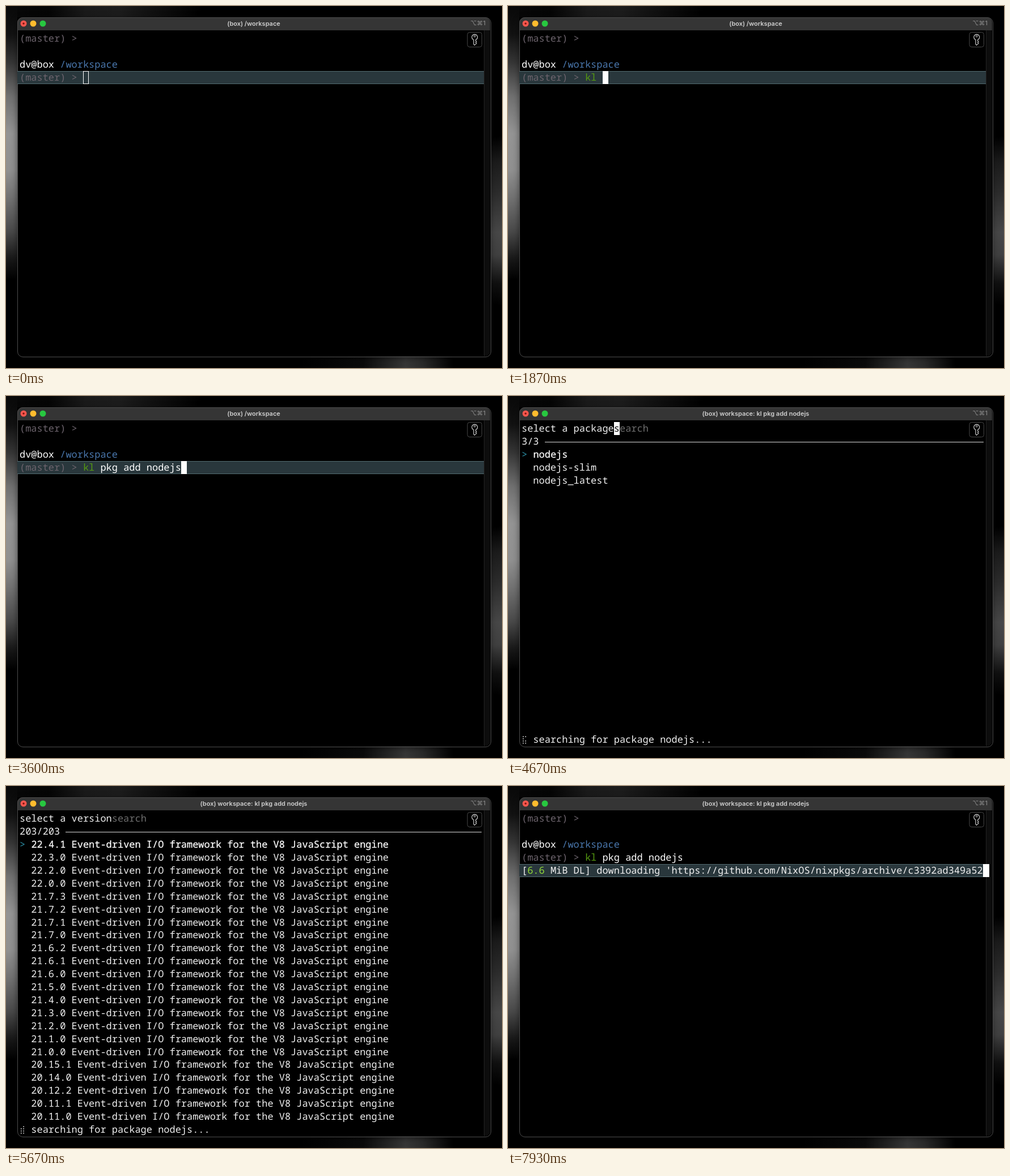
These frames come from a looping animation (875x640 px, 8 s). An HTML page:

```html
<!DOCTYPE html>
<html lang="en">
<head>
<meta charset="utf-8">
<title>Terminal</title>
<style>
html, body { margin: 0; width: 100%; height: 100%; overflow: hidden; background: #000; }
#stage { position: relative; width: 875px; height: 640px; overflow: hidden; background: #000; }
#stage div, #stage svg { position: absolute; }
.left { left: 0; top: 0; width: 20px; height: 640px;
  background: linear-gradient(#080808 0, #121212 50px, #363636 100px, #707070 160px, #949494 225px, #909090 290px, #6e6e6e 345px, #484848 400px, #1a1a1a 445px, #000 485px); }
.top { left: 0; top: 0; width: 875px; height: 20px;
  background: linear-gradient(90deg, #080808, #050505 75px, #1a1a1a 140px, #1c1c1c 200px, #000 345px); }
.right { left: 855px; top: 0; width: 20px; height: 640px;
  background: linear-gradient(#000 230px, #1b1b1b 275px, #2c2c2c 330px, #474747 400px, #404040 440px, #101010 490px, #000 530px); }
.bottom { left: 0; top: 619px; width: 875px; height: 21px;
  background: linear-gradient(90deg, #000 510px, #0b0b0b 630px, #363636 705px, #2a2a2a 735px, #000 790px); }
.window { left: 20px; top: 20px; width: 834px; height: 599px; border-radius: 9px; background: #000;
  overflow: hidden; box-shadow: 0 3px 12px rgba(0, 0, 0, .5); }
.frame { left: 19.5px; top: 19.5px; width: 834px; height: 599px; border: 1px solid #4c4c4c; border-radius: 10px; }
.bar { left: 0; top: 0; width: 835px; height: 23px; background: #353535; }
.scroll { left: 823px; top: 23px; width: 11px; height: 577px; background: #0d0d0d; border-left: 1px solid #222; }
#title { left: 0; top: 20px; width: 874px; text-align: center; white-space: pre;
  font: 600 11px/22px Inter, sans-serif; color: #d0d0d0; }
.hint { right: 29px; top: 20px; font: 500 11px/21px Inter, "DejaVu Sans", sans-serif; color: #858585; }
.row { left: 24px; height: 22.9px; font: 16.97px/22.9px "Noto Sans Mono", monospace; white-space: pre;
  color: #f0f0f0; text-rendering: geometricPrecision; font-variant-ligatures: none; }
.mark { left: 20px; width: 823px; height: 22.9px; box-sizing: border-box; background: #29373c;
  border: solid #536b70; border-width: 1px 0; }
.cursor { width: 10.3px; height: 22.9px; background: #fff; box-sizing: border-box; }
.hollow { background: none; border: 1px solid #fff; }
.rule { top: 81px; height: 1px; background: #dcdcdc; }
.prompt { color: #6d646d; }
.user, .bright { color: #fff; }
.path { color: #4a78ae; }
.cmd { color: #559a12; }
.size { color: #91da3a; }
.dim { color: #6e6e6e; }
.point { color: #2c91a8; }
.bright { -webkit-text-stroke: .25px #fff; }
.over { color: #000; }
</style>
</head>
<body>
<div id="stage">
  <div class="top"></div><div class="left"></div><div class="right"></div><div class="bottom"></div>
  <div class="window"><div class="bar"></div><div class="scroll"></div></div>
  <div class="frame"></div>
  <svg width="875" height="80">
    <circle cx="31" cy="31" r="5.5" fill="#fe564d"/><circle cx="31" cy="31" r="1.8" fill="#7d1410"/>
    <circle cx="48" cy="31" r="5.5" fill="#febc2e"/>
    <circle cx="65" cy="31" r="5.5" fill="#28c840"/>
  </svg>
  <div id="title"></div>
  <div class="hint">⌥⌘1</div>
  <div id="screen"></div>
  <svg width="875" height="80" fill="none">
    <rect x="814" y="46.5" width="25.5" height="26" rx="4" fill="#000" stroke="#484848"/>
    <path d="M825 59.8A5 5 0 1 1 828.6 59.8V61.5L830 63L828.6 64.5L830 66L828.4 67.6L826.5 69.2L825 67.6Z" stroke="#ccc" stroke-width="1.2"/>
    <circle cx="826.8" cy="53.4" r="1.5" stroke="#ccc"/>
  </svg>
</div>
<script>
const LOOP = 8000, CELL = 10.18, LINE = 22.9, LEFT = 24, TOP = 46.3;
const command = "kl pkg add nodejs";
const keys = [1670, 1730, 1870, 2000, 2130, 2200, 2270, 2400, 2530, 2670, 2730,
  2870, 3000, 3130, 3200, 3330, 3470];
const at = { focus: 600, run: 3670, packages: 4330, picked: 4930, versions: 5330, chosen: 5930, fetch: 6070 };
const progress = [[7670, "0.4"], [7730, "1.9"], [7800, "3.5"], [7870, "5.1"], [7930, "6.6"]];
const versions = ("22.4.1 22.3.0 22.2.0 22.0.0 21.7.3 21.7.2 21.7.1 21.7.0 21.6.2 21.6.1 21.6.0 " +
  "21.5.0 21.4.0 21.3.0 21.2.0 21.1.0 21.0.0 20.15.1 20.14.0 20.12.2 20.11.1 20.11.0")
  .split(" ").map(v => v + " Event-driven I/O framework for the V8 JavaScript engine");
const url = "downloading 'https://github.com/NixOS/nixpkgs/archive/c3392ad349a5227f4a3464dce8";
// Braille dots in the order the gap travels round the cell
const dots = [[0, 0], [0, 1], [0, 2], [0, 3], [1, 3], [1, 2], [1, 1], [1, 0]];

const screen = document.getElementById("screen"), title = document.getElementById("title");
const x = col => LEFT + col * CELL;
const y = row => TOP + row * LINE;
const span = (name, text) => `<span class="${name}">${text}</span>`;
const line = (row, html) => `<div class="row" style="top:${y(row)}px">${html}</div>`;
const mark = row => `<div class="mark" style="top:${y(row)}px"></div>`;
const cursor = (row, col, look = "") =>
  `<div class="cursor ${look}" style="left:${x(col)}px;top:${y(row)}px"></div>`;

function spinner(row, t) {
  const gap = Math.floor(t / 100) % 8;
  const rects = dots.map(([i, j], n) => n === gap ? "" :
    `<rect x="${2 + i * 4.3}" y="${5.5 + j * 3.8}" width="1.6" height="1.6"/>`).join("");
  return `<svg width="11" height="23" fill="#f0f0f0" style="left:${LEFT}px;top:${y(row)}px">${rects}</svg>` +
    line(row, "  searching for package nodejs...");
}

function picker(what, items, total, showCursor) {
  const count = `${total}/${total}`, start = x(count.length + 1);
  const head = "select a " + what;
  const hint = showCursor ? span("over", "s") + span("dim", "earch") : span("dim", "search");
  return (showCursor ? cursor(0, head.length) : "") + line(0, head + hint) + line(1, count) +
    `<div class="rule" style="left:${start}px;width:${839 - start}px"></div>` +
    items.map((item, i) => line(i + 2, i ? "  " + item :
      span("point", "&gt;") + " " + span("bright", item))).join("");
}

function shell(t) {
  const typed = command.slice(0, keys.filter(k => t >= k).length);
  const prompt = span("prompt", "(master) &gt; ");
  const text = line(0, prompt) + line(2, span("user", "dv@box ") + span("path", "/workspace")) +
    line(3, prompt + span("cmd", typed.slice(0, 2)) + span("user", typed.slice(2)));
  if (t < at.run)
    return mark(3) + text + cursor(3, 11 + typed.length, t < at.focus ? "hollow" : "");
  if (t < at.chosen)
    return mark(4) + text + spinner(4, t) + cursor(4, 33);
  if (t < at.fetch)
    return mark(4) + text + cursor(4, 0);
  const step = progress.filter(p => t >= p[0]).pop();
  const status = step ? "[" + span("size", step[1]) + " MiB DL] " + url.slice(0, 67) : url;
  return mark(4) + text + line(4, status) + cursor(4, 80);
}

function view(t) {
  if (t >= at.packages && t < at.picked)
    return picker("package", ["nodejs", "nodejs-slim", "nodejs_latest"], 3, true) + spinner(24, t);
  if (t >= at.versions && t < at.chosen)
    return picker("version", versions, 203, false) + spinner(24, t);
  return shell(t);
}

let shown = "";
function draw(now) {
  const t = now % LOOP, html = view(t);
  if (html !== shown) {
    screen.innerHTML = shown = html;
    title.textContent = t < at.run ? "(box) /workspace" : "(box) workspace: " + command;
  }
  requestAnimationFrame(draw);
}
requestAnimationFrame(draw);
</script>
</body>
</html>
```
